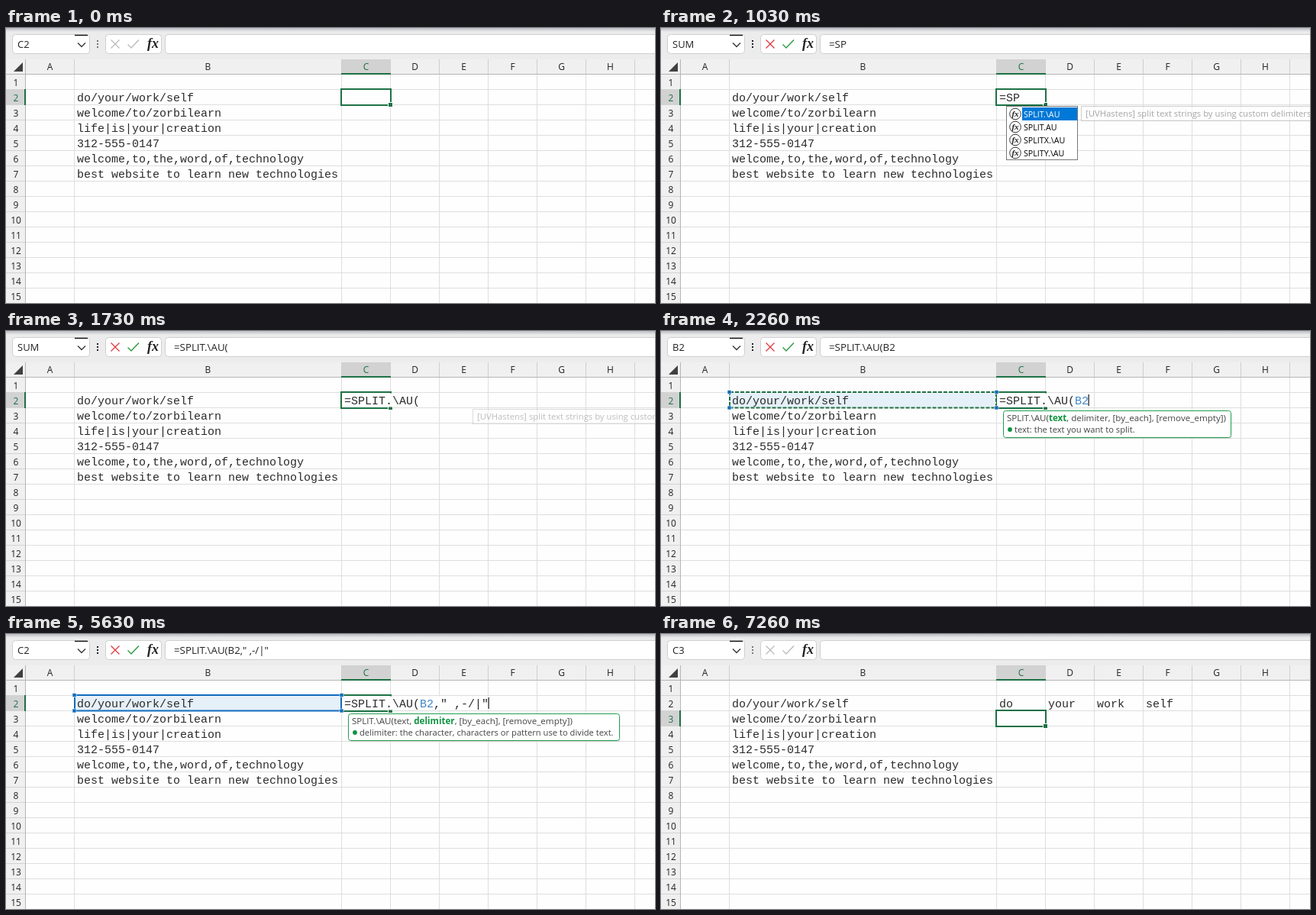
Write an HTML page that moves like this. It is 850 px wide and 360 px high and loops after 8000 ms.

```html
<!DOCTYPE html>
<html lang="en">
<head>
<meta charset="utf-8">
<title>Splitting text in a sheet</title>
<style>
html, body { margin: 0; width: 100%; height: 100%; overflow: hidden; background: #fff; }
svg { display: block; width: 100vw; height: 100vh; }
text { white-space: pre; font-family: "Open Sans", "Noto Sans", sans-serif; fill: #222; }
.cell { font: 15px "Liberation Mono", monospace; fill: #2b2b2b; }
.head { font-size: 12px; text-anchor: middle; }
.on { fill: #1e7145; }
.name { font-size: 13px; }
.bar { font-size: 13.3px; }
.item { font-size: 10.7px; fill: #000; }
.tip { font-size: 11.3px; fill: #666; }
.sig { font-size: 11.6px; fill: #444; }
.note { font-size: 11.2px; fill: #444; }
.note, .sig { font-family: "Open Sans", "DejaVu Sans", "Noto Sans CJK SC", sans-serif; }
.arg { font-weight: bold; fill: #0f9440; }
.fx { font: italic bold 18px "Liberation Serif", serif; }
.fx.small { font-size: 11px; text-anchor: middle; }
</style>
</head>
<body>
<svg id="stage" viewBox="0 0 850 360" preserveAspectRatio="none">
  <defs>
    <linearGradient id="shade" x1="0" y1="0" x2="0" y2="1">
      <stop offset="0" stop-color="#b9bcc4"/><stop offset="1" stop-color="#ececec"/>
    </linearGradient>
  </defs>
</svg>
<script>
const LOOP = 8000;
const GREEN = "#1e7145", BLUE = "#0f6cbd";
const stage = document.getElementById("stage");

function add(parent, tag, attrs = {}, content) {
  const node = document.createElementNS("http://www.w3.org/2000/svg", tag);
  for (const k in attrs) node.setAttribute(k, attrs[k]);
  if (content !== undefined) node.textContent = content;
  parent.appendChild(node);
  return node;
}
const group = (parent = stage) => add(parent, "g");
const box = (p, x, y, width, height, fill, extra) => add(p, "rect", { x, y, width, height, fill, ...extra });
const label = (p, x, y, cls, s) => add(p, "text", { x, y, class: cls }, s);
const line = (p, d, stroke, width = 1) => add(p, "path", { d, stroke, fill: "none", "stroke-width": width });
const show = (node, on) => node.setAttribute("opacity", +on);

// Toolbar
box(stage, 0, 0, 850, 360, "#fefefe");
box(stage, 0, 0, 850, 41, "#ececec");
box(stage, 0, 0, 850, 5, "url(#shade)");
const field = (x, w) => box(stage, x, 8.5, w, 25, "#fff", { stroke: "#cfcfcf", rx: 4 });
field(8.5, 101);
field(130.5, 73);
field(208.5, 660);
line(stage, "M90 9.5H107", "#111", 1.4);
line(stage, "M94 19.5L99 24.5L104 19.5", "#333", 1.3);
const dots = group();
for (const y of [16, 20, 24]) box(dots, 119, y, 2, 2, "inherit");
const cross = line(stage, "M137.5 15.5L148.5 26.5M148.5 15.5L137.5 26.5", "#bbb", 1.3);
const tick = line(stage, "M159.5 21.5L164 26L174 15.5", "#bbb", 1.4);
label(stage, 185, 26, "fx", "fx");
const nameText = label(stage, 15, 26, "name", "");
const barText = label(stage, 220, 25.5, "bar", "");

// Grid and headers
const edges = [25, 89, 439, 503, 567, 631, 695, 759, 823];
box(stage, 0, 41, 850, 19, "#f0f0f0");
box(stage, 0, 41, 25, 319, "#f0f0f0");
for (const x of edges) {
  line(stage, `M${x + .5} 41V60`, "#cfcfcf");
  line(stage, `M${x + .5} 60V360`, "#dedede");
}
for (let y = 60; y < 360; y += 20) {
  line(stage, `M0 ${y + .5}H25`, "#d3d3d3");
  line(stage, `M25 ${y + .5}H850`, "#dedede");
}
line(stage, "M0 60.5H850M25.5 41V360", "#b5b5b5");
add(stage, "path", { d: "M22 45V57H10Z", fill: "#404040" });
box(stage, 440, 41, 63, 19, "#d2d2d2");
line(stage, "M439 60H504", GREEN, 2);
[..."ABCDEFGH"].forEach((c, i) =>
  label(stage, (edges[i] + edges[i + 1]) / 2 + .5, 55, c === "C" ? "head on" : "head", c));
const rowMark = group();
box(rowMark, 0, 81, 24, 19, "#d2d2d2");
line(rowMark, "M25 80V101", GREEN, 2);
const rowNums = [];
for (let r = 1; r <= 15; r++) rowNums[r] = label(stage, 13, 55.5 + 20 * r, "head", r);

// Selected cell
const sel = group();
box(sel, 439, 80, 65, 21, "none", { stroke: GREEN, "stroke-width": 2 });
box(sel, 500.5, 97.5, 6, 6, GREEN, { stroke: "#fff" });

// Cell being edited
const edit = group();
const paper = box(edit, 440, 81.5, 10, 18, "#fefefe");
const typed = add(edit, "text", { x: 443, y: 96, class: "cell" });
const [before, ref, after] = [0, 1, 2].map(() => add(typed, "tspan"));
ref.setAttribute("style", "fill:#3f87c9");
const caret = box(edit, 0, 83, 1.2, 15, "#111");

// Referenced cell
const refBox = group();
box(refBox, 90, 81, 349, 19, "#e6f0f8");
const frame = box(refBox, 90, 80, 349, 20.5, "none", { "stroke-width": 2 });
for (const x of [87, 437]) for (const y of [77.5, 98]) box(refBox, x, y, 5, 5, BLUE, { stroke: "#fff", "stroke-width": .6 });

["do/your/work/self", "welcome/to/zorbilearn", "life|is|your|creation", "312-555-0147",
 "welcome,to,the,word,of,technology", "best website to learn new technologies"]
  .forEach((s, i) => label(stage, 93, 96 + 20 * i, "cell", s));
const result = group();
["do", "your", "work", "self"].forEach((s, i) => label(result, 443 + 64 * i, 96, "cell", s));

// Function list
function menu(x, right, names) {
  const g = group();
  box(g, x + .5, 102.5, right - x, names.length * 17 + 2, "#fff", { stroke: "#777" });
  names.forEach((s, i) => {
    const y = 104 + 17 * i;
    if (!i) box(g, x + 21, y, right - x - 21, 17, "#0078d7");
    add(g, "circle", { cx: x + 12, cy: y + 8.5, r: 7.3, fill: "#fff", stroke: "#333" });
    label(g, x + 12, y + 12, "fx small", "fx");
    const t = label(g, x + 23, y + 13, "item", s);
    if (!i) t.style.fill = "#fff";
  });
  return g;
}
const menus = [
  [menu(452, 545, "SEARCH SEARCHB SEC SECH SECOND SEQUENCE SERIESSUM SHEET SHEETS SIGN SIN SINH".split(" ")), 760, 930],
  [menu(452, 545, ["SPLIT.\\AU", "SPLIT.AU", "SPLITX.\\AU", "SPLITY.\\AU"]), 930, 1600],
  [menu(514, 606, "ABS ACCRINT ACCRINTM ACOS ACOSH ACOT ACOTH ADDRESS AGGREGATE AMORDEGRC AMORLINC AND".split(" ")), 1660, 1715]
];

const tip = group();
box(tip, 550.5, 102.5, 310, 19, "#fff", { stroke: "#aaa" });
label(tip, 556, 116, "tip", "[UVHastens] split text strings by using custom delimiters");

// Argument hints
const args = ["text", "delimiter", "[by_each]", "[remove_empty]"];
function hint(active, width, height) {
  const g = group();
  box(g, 449.5, 106, width, height, "#000", { rx: 3, opacity: .08 });
  box(g, 448.5, 104.5, width, height, "#fff", { rx: 3, stroke: "#21a050" });
  const sig = label(g, 453, 118, "sig", "SPLIT.\\AU(");
  args.forEach((a, i) => {
    add(sig, "tspan", i === active ? { class: "arg" } : {}, a);
    add(sig, "tspan", {}, i < 3 ? ", " : ")");
  });
  add(g, "circle", { cx: 457, cy: 129, r: 2.9, fill: "#0f9440" });
  return g;
}
const hintText = hint(0, 298, 35);
label(hintText, 463, 133, "note", "text: the text you want to split.");
const hintDelim = hint(1, 355, 35);
label(hintDelim, 463, 133, "note", "delimiter: the character, characters or pattern use to divide text.");
const hintEach = hint(2, 420, 50);
const note = (y, parts) => parts.forEach(([x, s]) => label(hintEach, x, y, "note", s));
note(133, [[463, "[by_each]:"], [519, "⟨0 or omitted("], [601, "✔"], [611, ") = disable⟩"], [675, "⟨1 = enable⟩"], [736, "divide text by characters"]]);
note(148, [[519, "⟨0("], [535, "✔"], [545, ") = match⟩"], [602, "⟨1 = group ⟩"], [671, "divide text using delimiter pattern"]]);

// Timeline
const formula = '=SPLIT.\\AU(B2," ,-/|",1)';
const keys = [460, 760, 930, 1130, 1200, 1266, 1600, 1630, 1660, 1690, 1715, 2100, 2100,
  2500, 2950, 3200, 3430, 4100, 4660, 5160, 5560, 5960, 6400, 6700];
const names = [[0, "C2"], [460, "SUM"], [2100, "B2"], [2500, "C2"], [7230, "C3"]];
const carets = [[460, 1], [760, 0], [2160, 1], [2600, 0], [2950, 1], [3430, 0], [3800, 1],
  [4260, 0], [4660, 1], [5030, 0], [5160, 1], [5430, 0], [5560, 1], [6390, 0], [6700, 1], [6830, 0]];

const ramp = (t, a, b) => Math.min(1, Math.max(0, (t - a) / (b - a)));
const fade = (t, inA, inB, outA, outB) => ramp(t, inA, inB) * (1 - ramp(t, outA, outB));
const latest = (list, t) => list.filter(e => e[0] <= t).pop();

function render(t) {
  const editing = t >= 460 && t < 7230, done = t >= 7230;
  const n = editing ? keys.filter(k => k <= t).length : 0;
  const s = formula.slice(0, n);

  nameText.textContent = latest(names, t)[1];
  barText.textContent = s;
  dots.setAttribute("fill", editing ? "#222" : "#777");
  cross.setAttribute("stroke", editing ? "#e0383e" : "#bbb");
  tick.setAttribute("stroke", editing ? "#2b9a3e" : "#bbb");

  const drop = `translate(0 ${done ? 20 : 0})`;
  sel.setAttribute("transform", drop);
  rowMark.setAttribute("transform", drop);
  rowNums[2].setAttribute("class", done ? "head" : "head on");
  rowNums[3].setAttribute("class", done ? "head on" : "head");
  show(result, done);

  show(edit, editing);
  paper.setAttribute("width", Math.max(62, n * 9 + 4));
  before.textContent = s.slice(0, 11);
  ref.textContent = s.slice(11, 13);
  after.textContent = s.slice(13);
  caret.setAttribute("x", 442.5 + n * 9);
  const [at, on] = latest(carets, t) || [0, 0];
  const blink = ramp(t, at, at + (on ? 1 : 90));
  show(caret, on ? blink : 1 - blink);

  show(refBox, editing && t >= 2100);
  const picking = t < 2500;
  frame.setAttribute("stroke", picking ? GREEN : BLUE);
  frame.setAttribute("stroke-dasharray", picking ? "5 2" : "none");

  for (const [g, a, b] of menus) show(g, t >= a && t < b);
  tip.setAttribute("transform", `translate(${t < 1650 ? 0 : 61} 0)`);
  show(tip, fade(t, 950, 1090, 1650, 1790));

  show(hintText, t < 2530 ? ramp(t, 1800, 1930) : 0);
  show(hintDelim, t >= 2530 && t < 6020);
  show(hintEach, t >= 6020 ? 1 - ramp(t, 6830, 6960) : 0);
}

const start = performance.now();
function tickFrame() {
  render((performance.now() - start) % LOOP);
  requestAnimationFrame(tickFrame);
}
tickFrame();
</script>
</body>
</html>
```
